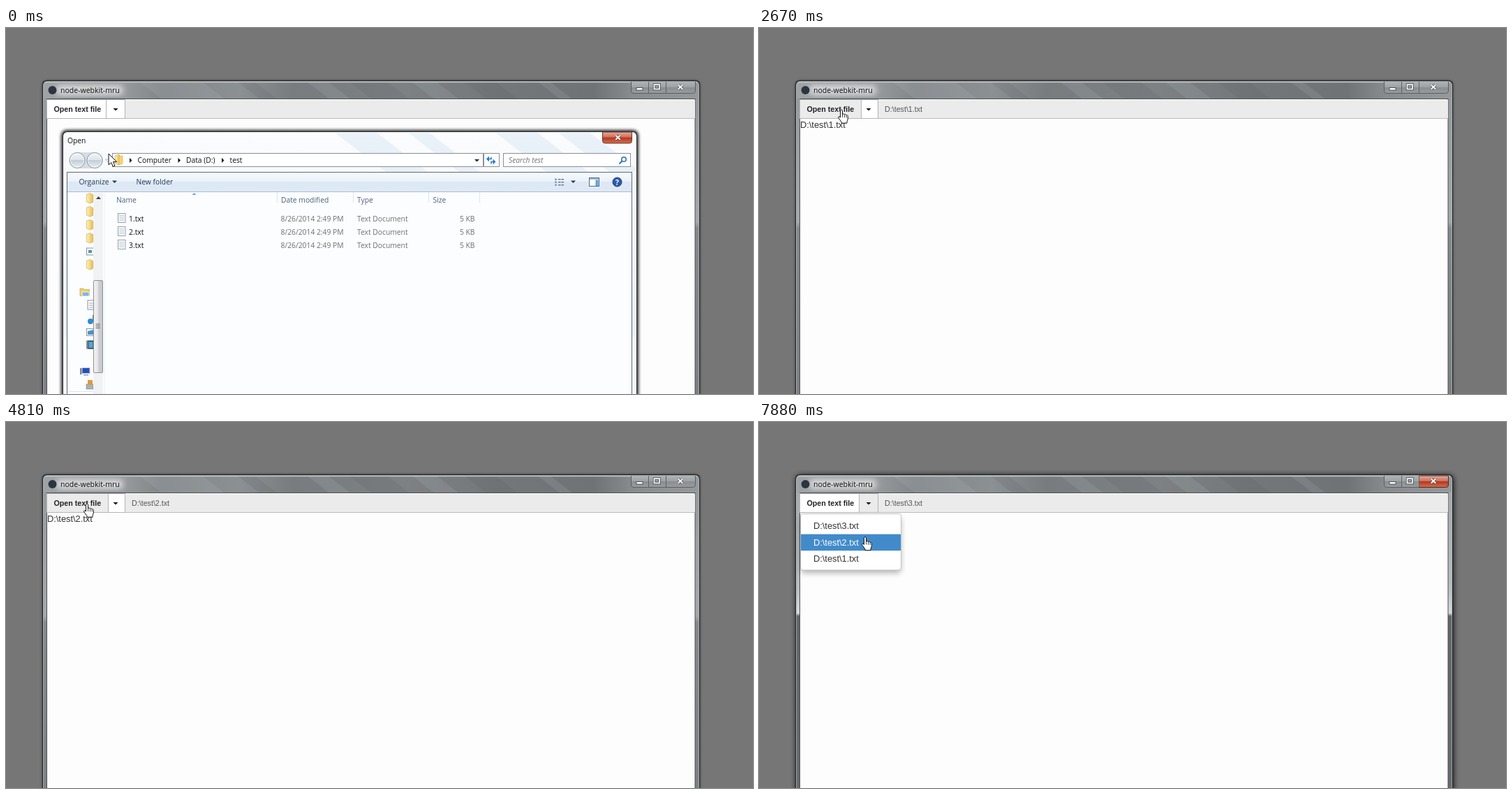
An HTML page for the animation above (8000 ms loop, 1070 by 524 pixels).

```html
<!DOCTYPE html>
<html lang="en">
<head>
<meta charset="utf-8">
<title>Recent files demo</title>
<style>
html, body { margin: 0; width: 100%; height: 100%; overflow: hidden; background: #767676; }
svg { display: block; font: 10.3px "Open Sans", "Noto Sans", sans-serif; }
text { white-space: pre; }
.ui { font: 12.8px "Liberation Sans", Arial, sans-serif; fill: #333; }
.bar { font-size: 10.7px; }
</style>
</head>
<body>
<svg id="stage" width="1070" height="524" viewBox="0 0 1070 524">
<defs>
  <filter id="blur2" x="-20%" y="-20%" width="140%" height="140%"><feGaussianBlur stdDeviation="2"/></filter>
  <filter id="blur4" x="-20%" y="-20%" width="140%" height="140%"><feGaussianBlur stdDeviation="4"/></filter>
  <clipPath id="titleClip"><rect x="54" y="77" width="938" height="24" rx="4"/></clipPath>
  <clipPath id="dialogClip"><rect x="83" y="150" width="818" height="56" rx="4"/></clipPath>
  <clipPath id="treeClip"><rect x="88" y="236" width="37" height="290"/></clipPath>
</defs>
</svg>
<script>
const LOOP = 8000;
const stage = document.getElementById('stage');
const $ = id => document.getElementById(id);

const rect = (x, y, w, h, fill, more = '') =>
  `<rect x="${x}" y="${y}" width="${w}" height="${h}" fill="${fill}" ${more}/>`;
const path = (d, fill = 'none', more = '') => `<path d="${d}" fill="${fill}" ${more}/>`;
const text = (x, y, s, fill = '#111', more = '') => `<text x="${x}" y="${y}" fill="${fill}" ${more}>${s}</text>`;
const group = (id, body, more = '') => `<g id="${id}" ${more}>${body}</g>`;
const line = (d, color, width = 1) => path(d, 'none', `stroke="${color}" stroke-width="${width}"`);
const down = (x, y, color = '#111', r = 3.5) => path(`M${x - r} ${y}h${2 * r}l${-r} ${r}z`, color);
const right = (x, y) => path(`M${x} ${y - 3.5}v7l3.5-3.5z`, '#111');
const grad = (id, stops, flat) =>
  `<linearGradient id="${id}" x2="${flat ? 1 : 0}" y2="${flat ? 0 : 1}">` +
  stops.map(([o, c]) => `<stop offset="${o}" stop-color="${c}"/>`).join('') + '</linearGradient>';
const streak = (x, w, color, o, top = 76, h = 26) =>
  path(`M${x} ${top}h${w}l${h * 1.3} ${h}h${-w}z`, color, `opacity="${o}"`);

const gradients =
  grad('glass', [[0, '#a0a3a5'], [.12, '#989b9d'], [.18, '#828689'], [.3, '#8b9093'], [.38, '#787c7f'],
    [.55, '#7d8184'], [.7, '#73777a'], [.84, '#6f7375'], [.9, '#888c8e'], [1, '#95999b']], true) +
  grad('sideLit', [[0, '#a2a6a8'], [.35, '#b8bdc0'], [.43, '#d6dadc'], [.44, '#626567'], [1, '#686b6d']]) +
  grad('sideDim', [[0, '#94989a'], [.44, '#a4a8aa'], [.46, '#85898b'], [1, '#7c8082']]) +
  grad('red', [[0, '#e5ab9d'], [.45, '#cf6f5a'], [.5, '#b53520'], [1, '#d4704f']]) +
  grad('pale', [[0, '#b0b3b5'], [.48, '#9da1a3'], [.5, '#8a8e90'], [1, '#989c9e']]) +
  grad('tools', [[0, '#f8fbfe'], [.48, '#e9f1fa'], [.5, '#dee8f5'], [1, '#dfe9f5']]) +
  grad('hover', [[0, '#f8fbff'], [1, '#e6f0fd']]) +
  grad('picked', [[0, '#dcebfc'], [1, '#bfdafb']]) +
  grad('orb', [[0, '#f2f4f6'], [.48, '#dfe5ea'], [.5, '#c3cdd8'], [1, '#e9eff5']]) +
  grad('thumb', [[0, '#f5f5f5'], [.48, '#e4e4e6'], [.5, '#d0d1d4'], [1, '#c4c6ca']], true) +
  grad('folder', [[0, '#fdf2bd'], [1, '#e9bd50']], true) +
  grad('frame', [[0, '#fbfcfd'], [.2, '#f5f8fa'], [.65, '#e9eff4'], [.67, '#f6f8fa'], [1, '#f4f6f8']]);

const cross = (x, y, edge) => {
  const d = `M${x - 3.2} ${y - 3}l6.4 6m0-6l-6.4 6`;
  return line(d, edge, 3.6) + line(d, '#fff', 1.9);
};

function mainWindow() {
  const frame = 'M52.5 530V82q0-6.5 6.5-6.5H987q6.5 0 6.5 6.5V530z';
  const side = fill => rect(53, 80, 6, 450, fill) + rect(987, 80, 6, 450, fill);
  const boxes = 'M895.5 77v13q0 3.5 3.5 3.5h84.5q4 0 4-3.5v-13';
  return group('shadowDim', path(frame, '#000', 'filter="url(#blur2)" opacity=".55"')) +
    group('shadowLit', path(frame, '#000', 'filter="url(#blur4)" transform="translate(1 1)" opacity=".9"')) +
    path(frame, '#85898b') +
    group('sidesDim', side('url(#sideDim)')) + group('sidesLit', side('url(#sideLit)')) +
    group('title', rect(54, 77, 938, 24, 'url(#glass)') +
      [[190, 90], [330, 25], [430, 30], [490, 55], [580, 35], [655, 45], [760, 18]]
        .map(([x, w], i) => streak(x, w, i % 2 ? '#575b5e' : '#b2bac0', .16)).join('') +
      rect(54, 77, 938, 1.2, '#d0d4d6', 'opacity=".8"') +
      rect(72, 82, 96, 14, '#fff', 'rx="6" filter="url(#blur4)" opacity=".62"'),
      'clip-path="url(#titleClip)"') +
    path(frame, 'none', 'stroke="#25282a" stroke-width="1.3"') +
    line('M53.6 530V83q0-6.3 6.4-6.3H986q6.4 0 6.4 6.3V530', '#c5c9cb', .7) +
    '<circle cx="66.5" cy="89" r="6" fill="#2b3440"/>' +
    text(78, 92.5, 'node-webkit-mru', '#0c0c0c', 'font-size="10.5"') +
    path(boxes, 'url(#pale)', 'stroke="#5a5e61"') +
    group('closeLit', path('M945.5 77v16.5h38q4 0 4-3.5v-13z', 'url(#red)', 'stroke="#4b2a24"')) +
    line('M920.5 77v16M945.5 77v16', '#5f6366') +
    rect(903, 85.5, 9, 3.5, '#fff', 'stroke="#444a50" stroke-width=".9"') +
    rect(928.5, 81, 7.5, 6.5, 'none', 'stroke="#444a50" stroke-width="3.4"') +
    rect(928.5, 81, 7.5, 6.5, 'none', 'stroke="#fff" stroke-width="1.7"') +
    cross(966, 84.5, '#444a50') +
    rect(58.5, 101.5, 928.5, 430, '#fdfdfd', 'stroke="#4c5052"') +
    rect(59, 103, 928, 26, '#ebebeb') + line('M59 129.5H987', '#bcbcbc') +
    rect(143.5, 102.5, 27, 27, '#fff', 'id="caretBtn" stroke="#b5b5b5"') +
    rect(58.5, 102.5, 85, 27, '#fff', 'id="openBtn" stroke="#b5b5b5"') +
    text(68.5, 120, 'Open text file', '', 'class="ui bar" style="font-weight:bold;fill:#222"') +
    down(157, 115) +
    text(180, 120, '', '', 'id="label" class="ui bar" style="fill:#555"') +
    text(59, 143, '', '', 'id="body" class="ui"');
}

const miniFolder = (x, y) =>
  path(`M${x} ${y - 6}l5-1.5 4 2v11l-4 1.5-5-2z`, 'url(#folder)', 'stroke="#cfa542" stroke-width=".6"');

function tree() {
  const page = rect(117, 390, 10, 13, '#fff', 'stroke="#8a929a"') + line('M119 394h6m-6 3h6m-6 3h6', '#9aa7b5');
  return group('tree', [244, 263, 282, 301, 339].map(y => miniFolder(115.5, y)).join('') +
    rect(115.5, 315, 10, 10, '#f4f7f9', 'stroke="#8b98a5"') + rect(118, 318, 5, 4, '#4e96a4') +
    path('M106 373h5l1.5 1.5h7v9h-13.5z', '#f0d070', 'stroke="#c59c3e" stroke-width=".7"') +
    rect(109, 378, 10, 6, '#7fb7dd', 'stroke="#fff" stroke-width=".8"') + page +
    '<circle cx="121" cy="420" r="4" fill="#2b8fd0"/>' + line('M124.5 411v9', '#6a7a88') +
    rect(115.5, 430.5, 12, 10, '#fff', 'stroke="#8797a6"') + path('M117 439v-5l8-2v7z', '#4a94c8') +
    rect(115.5, 447.5, 12, 12, '#25384a') + rect(118.5, 449, 6, 9, '#5aa5d2') +
    line('M117 448v12', '#dfe6ec', .8) +
    rect(109, 486.5, 11, 8, '#244fc0', 'stroke="#c2c8cf"') + rect(106, 487, 2.5, 9, '#7d8791') + rect(111, 496, 7, 1.5, '#98a2ab') +
    rect(115, 510, 10, 7, '#a9b2ba', 'stroke="#7c868f" stroke-width=".6"') + rect(117, 504, 7, 7, '#e19a3c') +
    line('M90 520.5H125', '#dde3ea'), 'clip-path="url(#treeClip)"') +
    rect(125, 236, 14, 294, '#f1f2f3') +
    path('M129 245h7l-3.5-4z', '#3c4046') +
    rect(125.5, 361.5, 13, 132, 'url(#thumb)', 'rx="1.5" stroke="#8d9095"') +
    line('M128.5 424h6m-6 2.7h6m-6 2.7h6', '#555b62') +
    line('M141.5 236V530', '#eef2f6');
}

function fileRow(name, i) {
  const y = 263 + 19 * i, base = y + 13.5;
  return rect(160.5, y + 2.5, 10.5, 13, '#fdfeff', 'stroke="#8f979e" stroke-width=".9"') +
    line(`M162 ${y + 5.5}h7.5m-7.5 2.3h7.5m-7.5 2.3h7.5m-7.5 2.3h7.5`, '#a9bccb', .8) +
    text(176, base, name) +
    text(393.5, base, '8/26/2014 2:49 PM', '#6d6d6d') +
    text(503, base, 'Text Document', '#6d6d6d') +
    text(671.5, base, '5 KB', '#6d6d6d', 'text-anchor="end"');
}

function dialog() {
  const frame = 'M81.5 596V155q0-6.5 6.5-6.5H897q6.5 0 6.5 6.5V596z';
  const ink = '#1e395b', head = '#4c607a';
  const orb = x => `<circle cx="${x}" cy="189.5" r="11" fill="url(#orb)" stroke="#8a95a2"/>` +
    `<circle cx="${x}" cy="189.5" r="9.7" fill="none" stroke="#fff" opacity=".8"/>`;
  const box = (x, w) => rect(x + .5, 179.5, w, 19, '#fff', 'stroke="#8a9097"');
  return path(frame, '#111', 'filter="url(#blur2)" opacity=".9" stroke="#111" stroke-width="5"') +
    path(frame, 'url(#frame)', 'stroke="#2f3438" stroke-width="1.3"') +
    group('sheen', [[470, 60], [575, 30], [700, 60], [790, 45]]
      .map(([x, w]) => streak(x, w, '#cfe0f1', .4, 149, 58)).join(''), 'clip-path="url(#dialogClip)"') +
    line('M82.7 596V156q0-6.3 6-6.3H896q6.3 0 6.3 6.3V596', '#fff') +
    text(88, 165, 'Open') +
    path('M854.5 149v12.5q0 3.5 3.5 3.5h35q3.5 0 3.5-3.5V149z', 'url(#red)', 'stroke="#6d3128"') + cross(876.5, 156.7, '#6c3f38') +
    rect(91, 178, 48, 23, '#b9c6d4', 'rx="11.5" opacity=".55"') + orb(102) + orb(127) +
    path('M142 188h7l-3.5 4z', '#f3f5f7', 'stroke="#b4bbc3" stroke-width=".8"') +
    box(152, 531) + box(684, 22) + box(712, 182) +
    path('M156 183l5-2 2 1v13l-2 1-5-2z', 'url(#folder)', 'stroke="#d2a94a" stroke-width=".6"') +
    path('M162 184l5-1v11l-5 2z', '#f3d77c', 'stroke="#d2a94a" stroke-width=".6"') +
    right(177, 189.5) + text(188.5, 193, 'Computer') + right(246.5, 189.5) +
    text(258, 193, 'Data (D:)') + right(309, 189.5) + text(320.5, 193, 'test') +
    down(674.5, 188, '#16283e') +
    line('M691 187.5h4v-2.5M698 191.5h-3v3', '#2c7cc4', 1.6) +
    path('M688 187.5l4-4v8zM701.5 191.5l-4-4v8z', '#2c7cc4') +
    text(720, 193, 'Search test', '#6f7276', 'font-style="italic"') +
    '<circle cx="885" cy="188" r="3.3" fill="#e8f3fc" stroke="#2f6fb5" stroke-width="1.5"/>' + line('M882.5 190.5l-4 4', '#2f6fb5', 2) +
    rect(87.5, 206.5, 809, 400, '#fbfdfe', 'stroke="#5e6b78"') +
    rect(88, 207, 808, 27, 'url(#tools)') + line('M88 234.5H896', '#a8bdd6') +
    text(104.5, 224, 'Organize', ink) + down(155.5, 218.5, ink) + text(186.5, 224, 'New folder', ink) +
    [215.5, 219.5, 223.5].map(y => rect(786, y, 3, 2.5, '#8aa0bb') + line(`M791 ${y + 1.2}h3.5m1 0h3.5`, '#66788f', 1.5)).join('') +
    down(812.5, 218.5, ink) +
    rect(835.5, 214.5, 14, 12, '#fff', 'stroke="#4f6a88"') + rect(836, 215, 13, 2, '#9db9d6') + rect(844.5, 217.5, 4, 8.5, '#5ba3d8') +
    '<circle cx="875.5" cy="220.5" r="6.5" fill="#2a5cad" stroke="#1d3d75"/>' +
    text(875.5, 224.5, '?', '#fff', 'text-anchor="middle" font-weight="bold"') +
    tree() +
    ['Name', 'Date modified', 'Type', 'Size'].map((s, i) => text([158, 394, 503, 611.5][i], 250, s, head)).join('') +
    line('M388.5 235v15M497.5 235v15M605.5 235v15M678.5 235v15', '#dfe5ec') +
    path('M266.5 239h6l-3-3z', '#7ea3c4') +
    rect(155.5, 0, 519, 18.5, 'none', 'id="rowMark" rx="2"') +
    ['1.txt', '2.txt', '3.txt'].map(fileRow).join('');
}

function menu() {
  const item = (n, i) => text(78, 153 + 23.6 * i, `D:\\test\\${n}.txt`, '', 'class="ui item"');
  return rect(60, 137, 143, 79, '#000', 'rx="4" filter="url(#blur4)" opacity=".3"') +
    rect(59.5, 131.5, 144, 80.5, '#fff', 'rx="3.5" stroke="#c4c4c4"') +
    rect(60, 0, 143, 23.6, '#428bca', 'id="itemMark"') + [3, 2, 1].map(item).join('');
}

const ARROW = 'M0 0V16L3.7 12.6 6.3 18.4 9 17.2 6.5 11.6H11.6Z';
const HAND = 'M-1.5 1.3c0-1.7 3-1.7 3 0v5.4c.6-1 2.7-.8 2.9.4.8-.7 2.5-.3 2.7.9 1-.5 2.2.1 2.2 1.4v3.6' +
  'c0 1.8-1.3 3-1.3 4.2v2h-8v-1.7l-4-5.5c-1.2-1.8.7-3 2-1.7l.5.8z';

stage.innerHTML += `<defs>${gradients}</defs>` + mainWindow() + group('dialog', dialog()) + group('menu', menu()) +
  group('pointer', path(ARROW, '#fff', 'id="arrow"') +
    group('hand', path(HAND, '#fff') + line('M1.5 6.5v4.5M4.4 7.5v3.8M7.1 8.5v3', '#111', .8)),
    'stroke="#111" stroke-width="1" stroke-linejoin="round"');

// Each step: time, pointer x, pointer y, changed state.
const steps = [
  [0, 147, 180, { dlg: 1, lit: 0, label: 0, body: 0, press: 0, menu: 0 }],
  [150, 152, 198], [290, 168, 230], [430, 188, 262], [580, 195, 274, { press: 1 }],
  [860, 195, 274, { dlg: .93, lit: 1 }], [1000, 195, 274, { dlg: .4 }],
  [1140, 195, 262, { dlg: 0, press: 0, label: 1 }], [1270, 195, 230], [1410, 195, 185], [1540, 194, 154],
  [1840, 186, 146, { body: 1 }],
  [2250, 165, 135], [2390, 132, 122], [2530, 118, 117], [2670, 118, 117, { lit: 0 }],
  [2820, 120, 122, { dlg: .6 }], [2950, 140, 170, { dlg: 1 }], [3080, 172, 250], [3210, 188, 290],
  [3490, 188, 290, { press: 1 }], [3740, 188, 290, { dlg: .93, lit: 1 }], [3880, 186, 280, { dlg: .4 }],
  [4010, 165, 215, { dlg: 0, press: 0, label: 2, body: 2 }], [4150, 132, 146], [4290, 116, 117],
  [4570, 116, 117], [4700, 116, 117, { lit: 0 }], [4840, 117, 120, { dlg: .6 }],
  [4970, 130, 160, { dlg: 1 }], [5100, 155, 220], [5230, 174, 275], [5360, 180, 300], [5500, 181, 305, { press: 1 }],
  [5810, 181, 305, { dlg: .93, lit: 1 }], [5950, 181, 300, { dlg: .4 }],
  [6090, 178, 250, { dlg: 0, press: 0, label: 3, body: 3 }], [6230, 168, 190], [6370, 157, 140], [6510, 152, 121],
  [6650, 152, 121, { menu: 1 }],
  [7330, 152, 130], [7470, 152, 141], [7610, 152, 152], [7750, 152, 162], [7880, 152, 164.5]
];
let carry = {};
const states = steps.map(([t, x, y, change]) => ({ ...(carry = { ...carry, ...change }), t, x, y }));

const show = (id, on) => $(id).setAttribute('visibility', on ? 'visible' : 'hidden');
const set = (id, attrs) => Object.entries(attrs).forEach(([k, v]) => $(id).setAttribute(k, v));
const fileName = n => n ? `D:\\test\\${n}.txt` : '';

function draw(s) {
  const onBar = !s.dlg && s.y < 130;
  const hotOpen = onBar && s.x < 147;
  const hotCaret = s.menu || (onBar && !hotOpen && s.x < 171);
  const item = s.menu && s.y >= 137 ? Math.floor((s.y - 137) / 23.6) : -1;
  const row = Math.floor((s.y - 263) / 19);
  const onRow = s.dlg > 0 && row >= 0 && row < 3;
  const hand = hotOpen || hotCaret;

  for (const id of ['shadowLit', 'sidesLit', 'closeLit']) show(id, s.lit);
  for (const id of ['shadowDim', 'sidesDim']) show(id, !s.lit);
  set('openBtn', { width: hotOpen ? 88 : 85, fill: hotOpen ? '#ebebeb' : '#fff' });
  set('caretBtn', { fill: hotCaret ? '#ebebeb' : '#fff' });
  $('label').textContent = fileName(s.label);
  $('body').textContent = fileName(s.body);

  const k = 1 - .19 * (1 - s.dlg);
  set('dialog', {
    display: s.dlg ? 'inline' : 'none', opacity: s.dlg,
    transform: `translate(${492 * (1 - k)} ${372 * (1 - k)}) scale(${k})`
  });
  set('rowMark', {
    display: onRow ? 'inline' : 'none', y: 263 + 19 * row,
    fill: s.press ? 'url(#picked)' : 'url(#hover)', stroke: s.press ? '#7da2ce' : '#b8d6fb'
  });

  set('menu', { display: s.menu ? 'inline' : 'none' });
  set('itemMark', { display: item < 0 ? 'none' : 'inline', y: 137 + 23.6 * item });
  document.querySelectorAll('.item').forEach((el, i) => { el.style.fill = i === item ? '#fff' : '#333'; });

  set('pointer', { transform: `translate(${s.x} ${s.y})` });
  show('arrow', !hand);
  show('hand', hand);
}

const start = performance.now();
let current;
function tick() {
  const t = (performance.now() - start) % LOOP;
  const s = states.findLast(v => v.t <= t) || states[0];
  if (s !== current) draw(current = s);
  requestAnimationFrame(tick);
}
tick();
</script>
</body>
</html>
```
